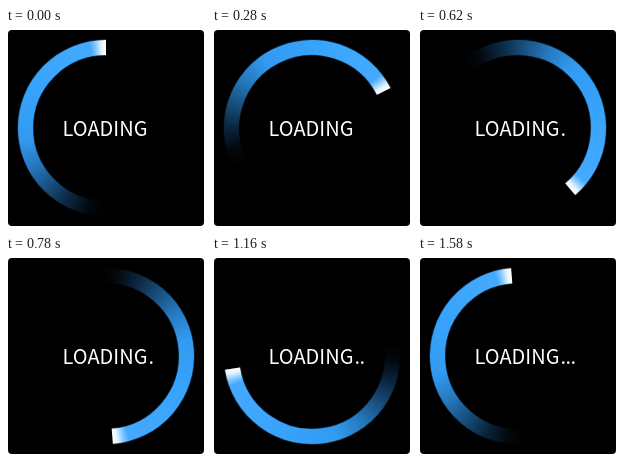
Write an HTML page with a canvas that moves like this. It is 200x200 px and loops after 1.6 s.

```html
<!DOCTYPE html>
<html lang="en">
<head>
<meta charset="utf-8">
<title>Loading</title>
<style>
  html, body { margin: 0; width: 100%; height: 100%; overflow: hidden; background: #fff; }
  canvas { display: block; width: 200px; height: 200px; }
</style>
</head>
<body>
<canvas id="stage" width="200" height="200"></canvas>
<script>
const ctx = document.getElementById('stage').getContext('2d');
const LOOP = 1600, STEP = 20, DOT_TIME = 400;
const CENTER = 100, RADIUS = 80.5, THICKNESS = 15;

// Degrees ahead of the tail, and the colour there
const SHADES = [
  [0, '#000000'], [12, '#02080d'], [28, '#0b2740'], [45, '#18507f'],
  [62, '#2678be'], [82, '#329af0'], [120, '#38a3fc'], [169, '#44aaff'],
  [173, '#8ccbff'], [177, '#e6f4ff'], [180, '#ffffff']
];

function drawPanel() {
  ctx.fillStyle = '#fff';
  ctx.fillRect(0, 0, 200, 200);
  ctx.fillStyle = '#000';
  ctx.beginPath();
  ctx.roundRect(2, 2, 196, 196, 4);
  ctx.fill();
}

function strokeArc(tail, width, alpha) {
  ctx.globalAlpha = alpha;
  ctx.lineWidth = width;
  ctx.beginPath();
  ctx.arc(CENTER, CENTER, RADIUS, tail, tail + Math.PI);
  ctx.stroke();
  ctx.globalAlpha = 1;
}

function drawRing(progress) {
  const tail = Math.PI / 2 + progress * Math.PI * 2;
  const shade = ctx.createConicGradient(tail, CENTER, CENTER);
  for (const [degrees, color] of SHADES) shade.addColorStop(degrees / 360, color);
  shade.addColorStop(0.75, '#fff');
  shade.addColorStop(0.75, '#000');
  ctx.strokeStyle = shade;
  strokeArc(tail, THICKNESS + 1.5, 0.25);
  strokeArc(tail, THICKNESS, 1);
}

function drawLabel(dots) {
  ctx.fillStyle = '#fff';
  ctx.font = '20px "Noto Sans CJK JP", "Noto Sans CJK SC", "Noto Sans CJK", "Open Sans", sans-serif';
  ctx.textBaseline = 'alphabetic';
  ctx.fillText('LOADING', 56.5, 108);
  for (let i = 0; i < dots; i++) ctx.fillText('.', 142.5 + i * 5, 108);
}

function draw(now) {
  const time = Math.floor((now % LOOP) / STEP) * STEP;
  drawPanel();
  drawRing(time / LOOP);
  drawLabel(Math.floor(time / DOT_TIME));
}

let start;
function tick(now) {
  start ??= now;
  draw(Math.max(0, now - start));
  requestAnimationFrame(tick);
}
draw(0);
requestAnimationFrame(tick);
</script>
</body>
</html>
```
